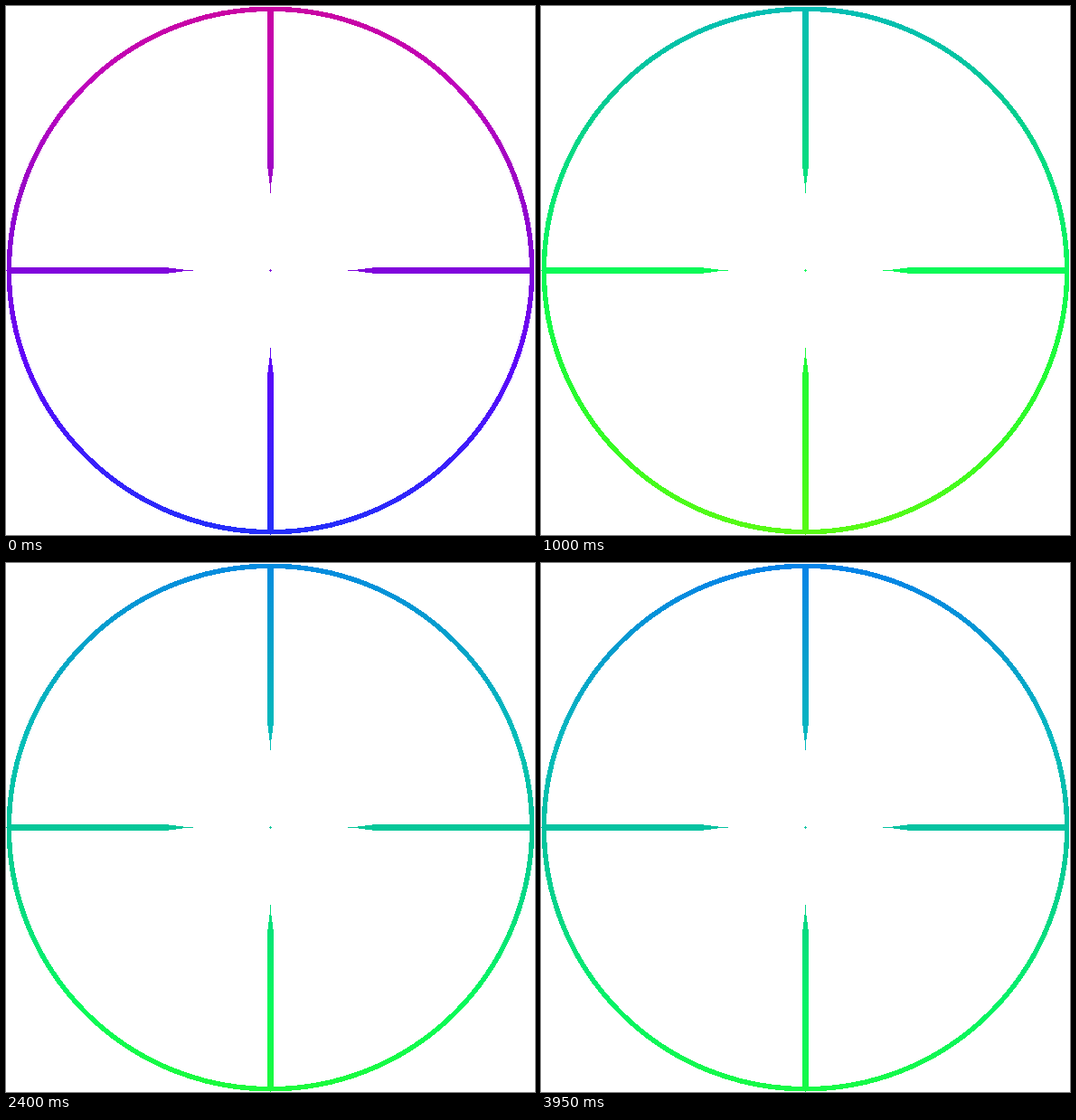
Write an HTML page that moves like this. It is 585x585 px and loops after 4000 ms.

```html
<!DOCTYPE html>
<html>
<head>
<meta charset="utf-8">
<style>
html, body { margin: 0; width: 100%; height: 100%; overflow: hidden; background: #fff; }
svg { display: block; width: 585px; height: 585px; }
</style>
</head>
<body>
<svg viewBox="0 0 585 585" shape-rendering="crispEdges">
  <linearGradient id="tint" gradientUnits="userSpaceOnUse" x1="0" y1="0" x2="0" y2="585"></linearGradient>
  <circle cx="292.5" cy="292.5" r="289.25" fill="none" stroke="url(#tint)" stroke-width="5.5"/>
  <path id="bars" fill="url(#tint)"/>
  <circle cx="292.5" cy="292.5" r="1.1" fill="url(#tint)"/>
</svg>
<script>
const LOOP = 4000, STEP = 50, CENTER = 292.5, SPAN = 75, STOPS = 7;
// time and hue at the top edge
const keys = [[0, 312], [300, 243], [1000, 177], [1850, 274], [2800, 152], [3550, 147], [3950, 207]];

// one tapered bar, as offsets from the centre, turned to four sides
const bar = [[-3.5, -290], [3.5, -290], [3.5, -116], [.6, -94], [.6, -85.5],
  [-.6, -85.5], [-.6, -94], [-3.5, -116]];
let outline = '';
for (let side = 0, points = bar; side < 4; side++) {
  outline += 'M' + points.map(([x, y]) => `${CENTER + x} ${CENTER + y}`).join('L') + 'Z';
  points = points.map(([x, y]) => [-y, x]);
}
document.getElementById('bars').setAttribute('d', outline);

const tint = document.getElementById('tint');
const stops = Array.from({ length: STOPS }, (_, i) => {
  const stop = document.createElementNS('http://www.w3.org/2000/svg', 'stop');
  stop.setAttribute('offset', i / (STOPS - 1));
  return tint.appendChild(stop);
});

// rainbow that is lighter around green and blue
function rainbow(hue) {
  const light = 47 + 9 * Math.cos(3 * (hue - 118) * Math.PI / 180);
  return `hsl(${hue}, 96%, ${light}%)`;
}

function topHue(t) {
  const next = Math.max(1, keys.findIndex(([time]) => time >= t));
  const [t0, h0] = keys[next - 1], [t1, h1] = keys[next];
  return h0 + (h1 - h0) * (t - t0) / (t1 - t0);
}

function draw(now) {
  const hue = topHue(Math.floor(now % LOOP / STEP) * STEP);
  stops.forEach((stop, i) =>
    stop.setAttribute('stop-color', rainbow(hue - SPAN * i / (STOPS - 1))));
}

const start = performance.now();
function tick() {
  draw(performance.now() - start);
  requestAnimationFrame(tick);
}
tick();
</script>
</body>
</html>
```
